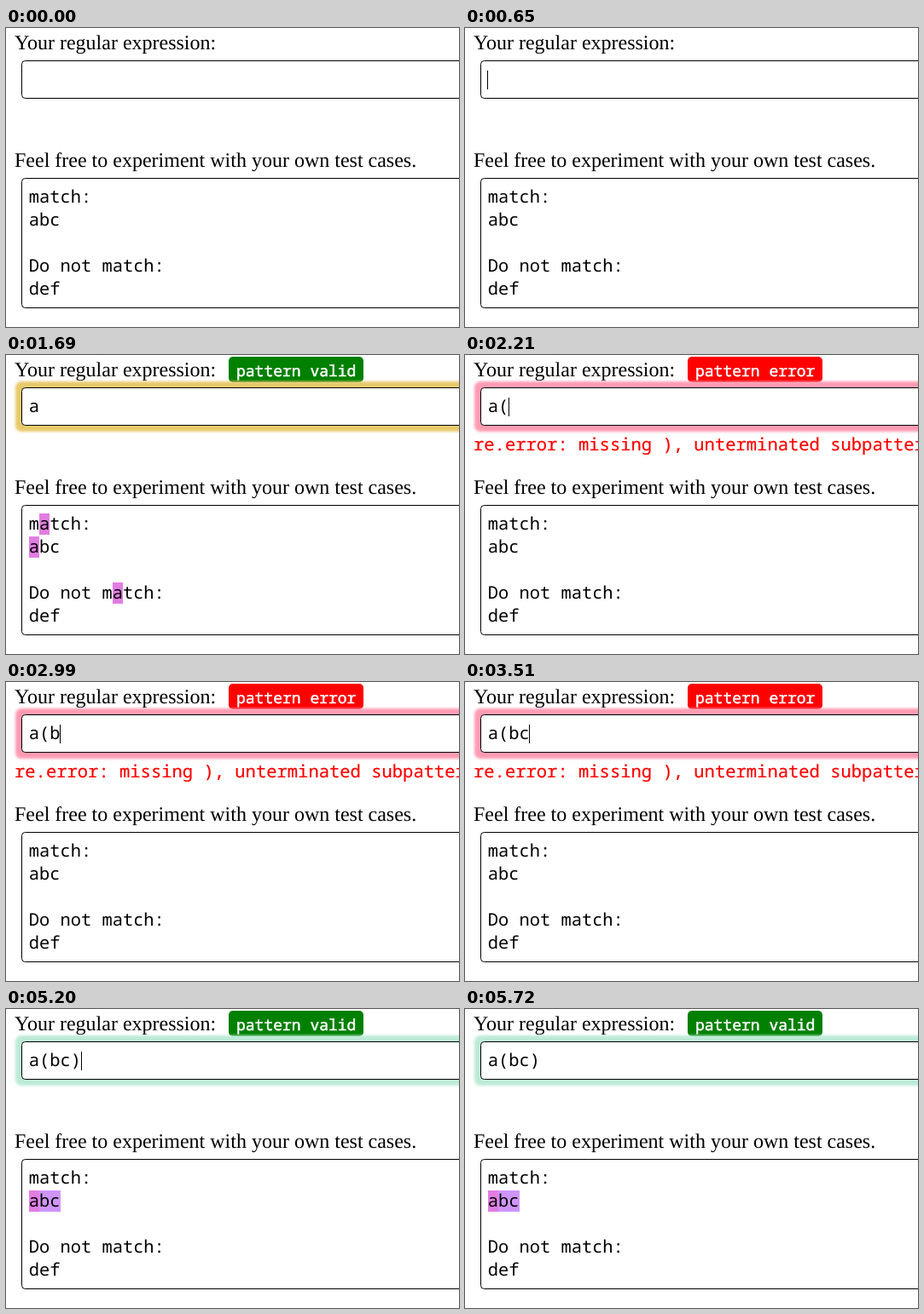
Write an HTML page that moves like this. It is 531 by 351 pixels and loops after 6240 ms.

```html
<!DOCTYPE html>
<html lang="en">
<head>
<meta charset="utf-8">
<title>Regular expression tester</title>
<style>
  html, body { margin: 0; width: 100%; height: 100%; overflow: hidden; background: #fff; }
  svg { display: block; }
  text { font: 20.4px "Noto Sans Mono", monospace; text-rendering: geometricPrecision; white-space: pre; }
  .label { font: 24px "Liberation Serif", serif; }
  .box { fill: #fff; stroke: #000; }
  #ring { filter: blur(1.5px); }
  #badgeText { font-size: 18px; fill: #fff; stroke: #fff; stroke-width: .5px; }
  #error { font-size: 20.5px; fill: #f00; stroke: #f00; stroke-width: .2px; }
</style>
</head>
<body>
<svg width="531" height="351" viewBox="0 0 531 351">
  <text class="label" x="10" y="25">Your regular expression:</text>
  <g id="badge">
    <rect id="badgeBox" x="261" y="2" width="158" height="30" rx="5"/>
    <text id="badgeText" x="270" y="25"></text>
  </g>
  <rect id="ring" x="11" y="31" width="600" height="59" rx="7"/>
  <rect class="box" x="18.5" y="38.5" width="600" height="44" rx="4"/>
  <text id="input" x="26.8" y="67"></text>
  <rect id="caret" y="50" width="1" height="22"/>
  <text id="error" x="10" y="112">re.error: missing ), unterminated subpattern</text>
  <text class="label" x="10" y="163">Feel free to experiment with your own test cases.</text>
  <rect class="box" x="18.5" y="176.5" width="600" height="152" rx="4"/>
  <g id="marks"></g>
  <g id="cases"></g>
</svg>
<script>
const LOOP = 6240, LEFT = 26.8, PITCH = 12.24, LINE = 27;
const $ = id => document.getElementById(id);

// start time, typed pattern, caret visible
const steps = [
  [0, '', false], [650, '', true],
  [1040, 'a', true], [1690, 'a', false],
  [2210, 'a(', true], [2990, 'a(b', true], [3510, 'a(bc', true],
  [4030, 'a(bc)', true], [4550, 'a(bc)', false],
  [5200, 'a(bc)', true], [5720, 'a(bc)', false]
];
const cases = ['match:', 'abc', '', 'Do not match:', 'def'];

$('cases').innerHTML = cases.map((line, i) =>
  `<text x="${LEFT}" y="${205 + i * LINE}">${line}</text>`).join('');

function compile(pattern) {
  try { return new RegExp(pattern, 'g'); } catch { return null; }
}

function mark(row, col, length, color) {
  const x = Math.round(LEFT + col * PITCH);
  const end = Math.round(LEFT + (col + length) * PITCH);
  return `<rect x="${x}" y="${186 + row * LINE}" width="${end - x}" height="25" fill="${color}"/>`;
}

function highlight(regex) {
  return cases.flatMap((line, row) => [...line.matchAll(regex)].map(m => {
    const group = m[1] || '';
    return mark(row, m.index, m[0].length, '#e27de2') +
      (group && mark(row, m.index + m[0].indexOf(group), group.length, '#cf95fa'));
  })).join('');
}

function show([, pattern, caret]) {
  const regex = compile(pattern), active = pattern !== '';
  const display = (id, on) => $(id).style.display = on ? '' : 'none';
  display('badge', active);
  display('ring', active);
  display('error', !regex);
  display('caret', caret);
  $('badgeBox').setAttribute('fill', regex ? '#008000' : '#f00');
  $('badgeText').textContent = regex ? 'pattern valid' : 'pattern error';
  $('ring').setAttribute('fill', !regex ? '#ff9bb3' : pattern === 'a' ? '#e8ca6c' : '#bcebd7');
  $('input').textContent = pattern;
  $('caret').setAttribute('x', Math.floor(LEFT + pattern.length * PITCH));
  $('marks').innerHTML = active && regex ? highlight(regex) : '';
}

let current;
function frame() {
  const t = performance.now() % LOOP;
  const step = steps.findLast(s => s[0] <= t);
  if (step !== current) show(current = step);
  requestAnimationFrame(frame);
}
frame();
</script>
</body>
</html>
```
